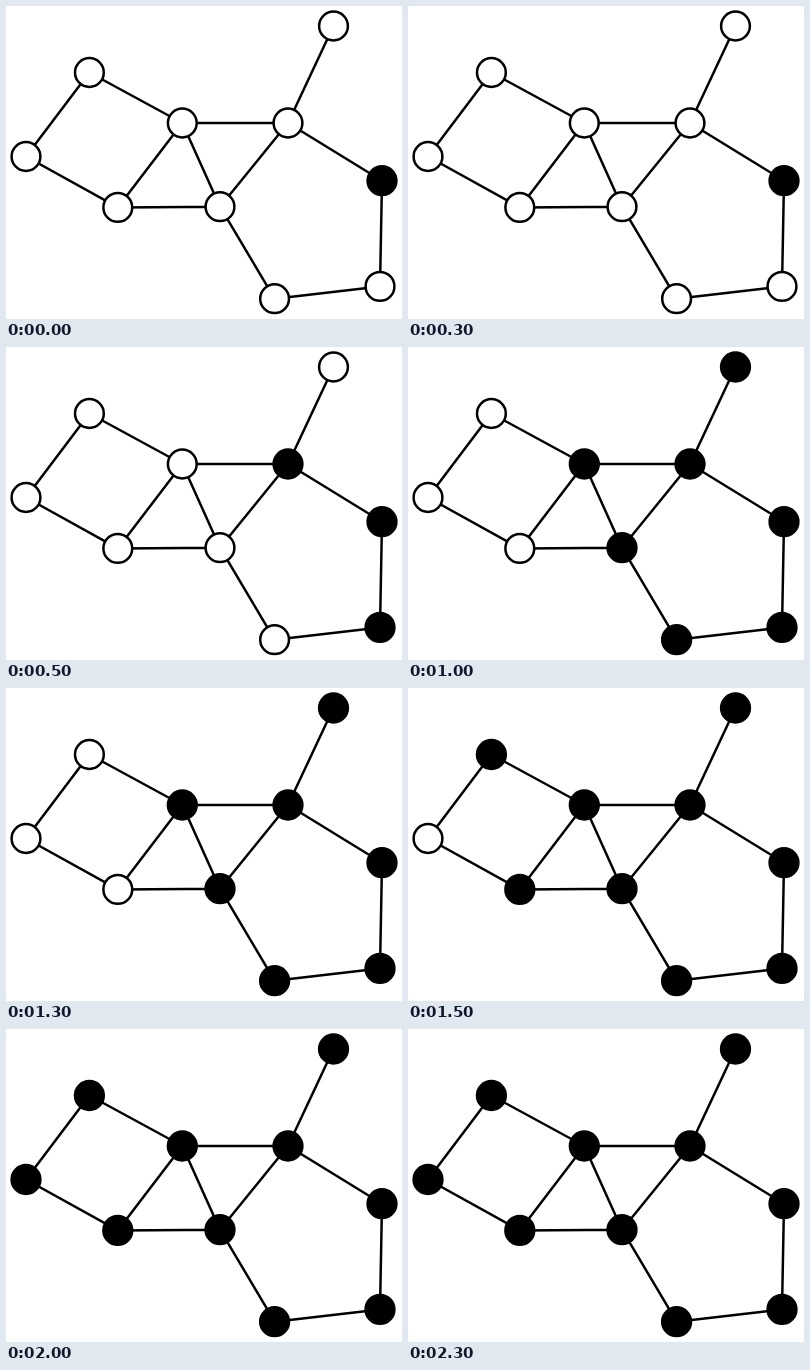
Recreate the animation shown at these times as an HTML page with a canvas. Size 396 by 313 pixels, loop 2500 ms.

```html
<!DOCTYPE html>
<html lang="en">
<head>
<meta charset="utf-8">
<title>Breadth-first spread on a graph</title>
<style>
  html, body { margin: 0; width: 100%; height: 100%; overflow: hidden; background: #fff; }
  canvas { display: block; }
</style>
</head>
<body>
<canvas id="stage" width="396" height="313"></canvas>
<script>
const ctx = document.getElementById('stage').getContext('2d');
const STEP = 500, STEPS = 5, RADIUS = 14.4, LINE = 2.5;

const nodes = {
  top: [327.5, 20], hub: [282, 117], start: [376, 174.7], right: [374, 280.4],
  bottom: [268.6, 292.7], mid: [214, 200.7], centre: [176.3, 117],
  low: [111.8, 201.4], high: [83.4, 66.5], left: [20, 150.5]
};
const edges = [
  ['top', 'hub'], ['hub', 'start'], ['start', 'right'], ['right', 'bottom'],
  ['bottom', 'mid'], ['mid', 'hub'], ['hub', 'centre'], ['centre', 'mid'],
  ['mid', 'low'], ['low', 'centre'], ['centre', 'high'], ['high', 'left'], ['left', 'low']
];

// Breadth-first distance of every node from the start node.
function distances(root) {
  const depth = { [root]: 0 }, queue = [root];
  for (const name of queue) {
    for (const edge of edges) {
      if (!edge.includes(name)) continue;
      const next = edge[0] === name ? edge[1] : edge[0];
      if (next in depth) continue;
      depth[next] = depth[name] + 1;
      queue.push(next);
    }
  }
  return depth;
}
const depth = distances('start');

function draw(step) {
  ctx.fillStyle = '#fff';
  ctx.fillRect(0, 0, 396, 313);
  ctx.strokeStyle = '#000';
  ctx.lineWidth = LINE;
  ctx.beginPath();
  for (const [from, to] of edges) {
    ctx.moveTo(...nodes[from]);
    ctx.lineTo(...nodes[to]);
  }
  ctx.stroke();
  for (const name in nodes) {
    ctx.beginPath();
    ctx.arc(...nodes[name], RADIUS, 0, Math.PI * 2);
    ctx.fillStyle = depth[name] <= step ? '#000' : '#fff';
    ctx.fill();
    ctx.stroke();
  }
}

const began = performance.now();
function tick() {
  draw(Math.floor((performance.now() - began) / STEP) % STEPS);
  requestAnimationFrame(tick);
}
tick();
</script>
</body>
</html>
```
